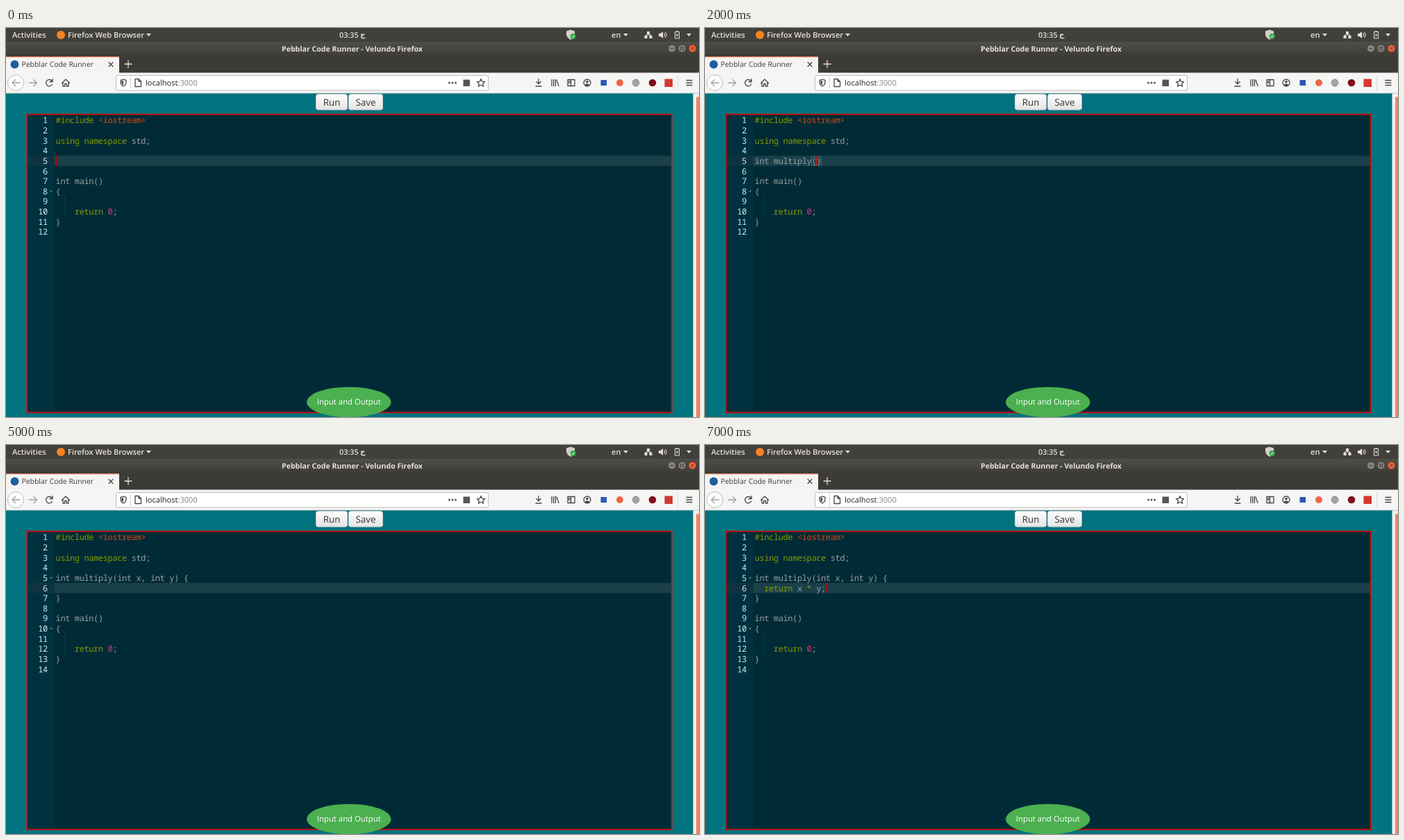
An HTML page for the animation above (8 s loop, 998x561 px).

```html
<!DOCTYPE html>
<html lang="en">
<head>
<meta charset="utf-8">
<title>Code editor</title>
<style>
  html, body { margin: 0; width: 998px; height: 561px; overflow: hidden; background: #00737f; }
  svg { display: block; font-family: "Open Sans", "Noto Sans", sans-serif; text-rendering: geometricPrecision; }
  .mono { font: 12px "Noto Sans Mono", "DejaVu Sans Mono", monospace; letter-spacing: -.384px; white-space: pre; }
  .panel { font-size: 11.1px; font-weight: 600; fill: #e4e1da; }
  .line { fill: none; stroke: #45454a; stroke-width: 1.3; stroke-linecap: round; stroke-linejoin: round; }
  .pale { fill: none; stroke: #dfdbd2; stroke-width: 1.1; }
</style>
</head>
<body>
<svg width="998" height="561" viewBox="0 0 998 561">
  <defs>
    <linearGradient id="bar" x2="0" y2="1">
      <stop offset="0" stop-color="#504e48"/><stop offset="1" stop-color="#3c3b37"/>
    </linearGradient>
    <linearGradient id="btn" x2="0" y2="1">
      <stop offset="0" stop-color="#fff"/><stop offset="1" stop-color="#e3e3e3"/>
    </linearGradient>
  </defs>

  <!-- desktop panel -->
  <rect width="998" height="20" fill="#42403b"/>
  <g class="panel">
    <text x="9" y="14">Activities</text>
    <circle cx="79" cy="10" r="6" fill="#f58220"/>
    <text x="89" y="14">Firefox Web Browser</text>
    <path d="M202 8h7l-3.500 4z"/>
    <text x="480" y="13.500" font-size="10.8">03:35</text>
    <text x="510" y="13" font-size="10.5" style="font-family:'DejaVu Sans',sans-serif">ج</text>
    <text x="872" y="14">en</text>
    <path d="M889 8h7l-3.500 4zM980 8h7l-3.500 4z"/>
    <path d="M813 2.500l6 2v5q-1 5-6 7.500q-5-2.500-6-7.500v-5z" fill="#d2d0cb"/>
    <circle cx="816.500" cy="12" r="4" fill="#35ad4c"/>
    <path d="M814.700 12l1.300 1.400l2.500-2.800" fill="none" stroke="#fff"/>
    <path d="M923 5h4v4h-4zM919.500 11h4v4h-4zM926.500 11h4v4h-4zM940 8h2.500l3.500-3v10l-3.500-3H940z"/>
    <path class="pale" d="M925 8v2.500M921.500 11.500v-1.500h7v1.500M947.500 7.500q2 2.500 0 5M949.500 6q3.200 4 0 8"/>
    <path class="pale" d="M963.500 5.500h6v9.500h-6zM965.500 4.500h2"/>
    <path d="M967 7l-2.300 3.500h1.800l-.8 3l2.700-4h-1.900z"/>
  </g>

  <!-- title bar and tabs -->
  <rect y="20" width="998" height="21" fill="url(#bar)"/>
  <rect y="40" width="998" height="25" fill="#3c3b37"/>
  <text x="498.500" y="33.700" text-anchor="middle" font-size="10.6" font-weight="700" fill="#e6e2da">Pebblar Code Runner - Velundo Firefox</text>
  <g stroke="#35342f" stroke-width=".8">
    <circle cx="959" cy="29.500" r="5.600" fill="#86847a"/>
    <circle cx="973.500" cy="29.500" r="5.600" fill="#86847a"/>
    <circle cx="988.500" cy="29.500" r="5.600" fill="#ef6035"/>
  </g>
  <path d="M956.800 29.500h4.400M971.500 27.700h4v3.600h-4zM986.700 27.700l3.600 3.600m0-3.600l-3.600 3.600" fill="none" stroke="#3a3934"/>
  <rect y="41" width="163" height="24" fill="#f5f4f2"/>
  <rect y="41" width="163" height="1.300" fill="#e9805c"/>
  <circle cx="12.500" cy="52.500" r="6" fill="#1d5f9e"/>
  <text x="22.500" y="56.200" font-size="10.4" fill="#3a3a3d">Pebblar Code Runner</text>
  <path class="line" d="M148 49.500l6 6m0-6l-6 6"/>
  <path class="line" style="stroke:#e2dfd7" d="M171 52h10m-5-5v10"/>

  <!-- toolbar -->
  <rect y="64.500" width="998" height="30" fill="#f5f5f4"/>
  <rect y="93.500" width="998" height="1" fill="#d0cfcc"/>
  <circle cx="14" cy="79" r="11.500" fill="#fbfbfb" stroke="#bdbcb9"/>
  <path class="line" style="stroke:#a2a2a2" d="M20 79H9m4.500-4.500L9 79l4.500 4.500M33.500 79h11m-4.500-4.500l4.500 4.500l-4.500 4.500"/>
  <path class="line" d="M66.500 77a4.700 4.700 0 1 0 0 4.200M67 73.500v4h-4M80.500 79.500l5.500-5.500l5.500 5.500M82 78.500v5.500h2.700v-3.500h2.600v3.500H90v-5.500"/>
  <rect x="158.500" y="68.500" width="536" height="21.500" rx="2" fill="#fff" stroke="#bcbbb8"/>
  <path class="line" d="M169 74l4 1.300v3.700q-.7 3.700-4 5q-3.300-1.300-4-5v-3.700zM186 73.500h5l3.500 3.500v7.500H186zM191 73.500V77h3.500"/>
  <path d="M169 75.500l-2.600 1v2.500q.4 2.400 2.600 3.500z" fill="#45454a"/>
  <path d="M179.500 71v17" stroke="#c9c9c9"/>
  <text x="201" y="83" font-size="11.1" fill="#252528">localhost<tspan fill="#85858a">:3000</tspan></text>
  <g fill="#55555a">
    <circle cx="638.500" cy="79" r="1.500"/><circle cx="643" cy="79" r="1.500"/><circle cx="647.500" cy="79" r="1.500"/>
    <rect x="658.500" y="74.500" width="9.500" height="9.500"/>
  </g>
  <path class="line" d="M684 73.500l1.700 3.700l4 .4l-3 2.700l.9 4l-3.600-2.100l-3.600 2.100l.9-4l-3-2.700l4-.4z"/>
  <path class="line" d="M767 73.500v7m-3.200-3l3.200 3.200l3.200-3.200M763 84h8M786 74.500v9M788.700 74.500v9M791.400 74.500v9M793 75l3 8.500"/>
  <path class="line" d="M809 74.500h10v9h-10zM813.500 74.500v9M810.500 77h1.500M810.500 79h1.500"/>
  <circle class="line" cx="837" cy="79" r="5"/>
  <circle cx="837" cy="77.500" r="1.800" fill="#45454a"/>
  <path d="M833.700 82q3.300-3.500 6.600 0q-3.300 3-6.600 0z" fill="#45454a"/>
  <rect x="856.500" y="75" width="8.500" height="8" fill="#2f57b8"/>
  <circle cx="884" cy="79" r="5" fill="#ee6546"/>
  <circle cx="907" cy="79" r="5" fill="#b8b8b8" stroke="#939393"/>
  <path d="M902 79h10M907 74v10M903.200 76.300h7.600M903.200 81.700h7.600" stroke="#8d8d8d" stroke-width=".7"/>
  <ellipse cx="907" cy="79" rx="2.500" ry="5" fill="none" stroke="#8d8d8d" stroke-width=".7"/>
  <circle cx="931" cy="79" r="5.300" fill="#800c1c"/>
  <rect x="948.500" y="73.500" width="11.500" height="11.500" fill="#d43832"/>
  <path d="M967.500 68v23" stroke="#deddda"/>
  <path class="line" d="M980 75.500h8M980 79h8M980 82.500h8"/>

  <!-- page -->
  <rect y="94.500" width="990" height="466.500" fill="#00737f"/>
  <rect x="989.500" y="94.500" width="8.500" height="466.500" fill="#f3f1ee"/>
  <rect x="994" y="99.500" width="4" height="461.500" fill="#ef8665"/>
  <rect x="446.500" y="95.500" width="45" height="22.500" rx="3" fill="url(#btn)" stroke="#c4c9c9"/>
  <rect x="493.500" y="95.500" width="49" height="22.500" rx="3" fill="url(#btn)" stroke="#c4c9c9"/>
  <g font-size="13.4" fill="#333" text-anchor="middle">
    <text x="469" y="111.500">Run</text><text x="518" y="111.500">Save</text>
  </g>
  <rect x="30.500" y="124.500" width="928" height="430" fill="#002b36"/>
  <rect x="31" y="125" width="38.500" height="429" fill="#01313f"/>
  <g id="editor"></g>
  <rect x="30.300" y="124.500" width="928.400" height="430" fill="none" stroke="#d90806" stroke-width="1.800"/>
  <ellipse cx="493.800" cy="539.500" rx="60.700" ry="21.800" fill="#4caf50"/>
  <text x="493.800" y="543.300" text-anchor="middle" font-size="11.36" fill="#fff">Input and Output</text>
</svg>
<script>
const LEFT = 71.6, TOP = 125.7, CHAR = 6.816, ROW = 14.64, STEP = 1000;
const editor = document.getElementById("editor");
const head = ["#include <iostream>", "", "using namespace std;", ""];
const tail = ["", "int main()", "{", "    ", "    return 0;", "}", ""];
const header = "int multiply(int x, int y) {";
const open = line => [...head, line, ...tail];
const closed = body => [...head, header, body, "}", ...tail];

// cur: caret column; boxes: bracket columns; popup: rows with matched letters in *stars*
const steps = [
  { code: open(""), row: 4, cur: 0 },
  { code: open("int mul"), row: 4, cur: 7, popup: ["*mu*tab*l*e"], at: 4 },
  { code: open("int multiply()"), row: 4, cur: 13, boxes: [12, 13] },
  { code: open("int multiply(int x, int)"), row: 4, cur: 23, boxes: [12, 23],
    popup: ["*int*", "re*int*erpret_cast"], at: 20 },
  { code: open(header), row: 4, cur: 28, boxes: [27] },
  { code: closed("  "), row: 5 },
  { code: closed("  return "), row: 5, cur: 9 },
  { code: closed("  return x * y;"), row: 5, cur: 15 }
];

const colX = c => LEFT + c * CHAR;
const rowY = r => TOP + r * ROW;
const esc = s => s.replace(/&/g, "&amp;").replace(/</g, "&lt;").replace(/>/g, "&gt;");
const rect = (x, y, w, h, style) => `<rect x="${x}" y="${y}" width="${w}" height="${h}" ${style}/>`;
const text = (x, y, fill, body, more = "") =>
  `<text class="mono" x="${x}" y="${y}" fill="${fill}" ${more}>${body}</text>`;

function paint(line) {
  return line.split(/(#include|<\w+>|\b(?:using|namespace|return)\b|\*|\b\d+\b)/).map((part, i) => {
    if (i % 2 === 0) return esc(part);
    const fill = part[0] === "<" ? "#cb4b16" : /^\d/.test(part) ? "#d33682" : "#859900";
    return `<tspan fill="${fill}">${esc(part)}</tspan>`;
  }).join("");
}

function drawPopup(rows, col) {
  const x = colX(col) - 3, y = 199.5, h = 19.3;
  let out = rect(x + 1.5, y + 1.5, 205.5, rows.length * h + 1, 'fill="#000" opacity=".25"') +
    rect(x, y, 205.5, rows.length * h + 1, 'fill="#fbfbfb" stroke="#d3d3d3"') +
    rect(x + .5, y + .5, 204.5, h, 'fill="#cad6fa"');
  rows.forEach((row, i) => {
    const body = row.split("*").map((s, k) =>
      k % 2 ? `<tspan font-weight="700" fill="#000">${s}</tspan>` : s).join("");
    out += text(x + 3, y + 14.3 + i * h, "#444", body);
  });
  return out;
}

function draw({ code, row, cur, boxes = [], popup, at }) {
  let out = rect(31, rowY(row), 38.5, ROW, 'fill="#0d3440"') +
    rect(69.5, rowY(row), 888.5, ROW, 'fill="#1a404a"');
  code.forEach((line, i) => {
    const y = rowY(i), base = y + 11.6;
    out += text(59.8, base, "#d0edf7", i + 1, 'text-anchor="end"');
    if (line.endsWith("{")) out += `<path d="M63 ${y + 6.3}h4l-2 2.6z" fill="#5e7c83"/>`;
    if (line.startsWith("    ")) out += rect(colX(2) - .8, y, .8, ROW, 'fill="#17414b"');
    out += text(LEFT, base, "#93a1a1", paint(line));
  });
  boxes.forEach(c => {
    out += rect(colX(c), rowY(row) + .5, CHAR, ROW - 1,
      'rx="2" fill="none" stroke="#93a1a1" stroke-opacity=".55" stroke-width=".8"');
  });
  if (cur !== undefined) out += rect(colX(cur), rowY(row), 1.5, ROW, 'fill="#d30102"');
  if (popup) out += drawPopup(popup, at);
  editor.innerHTML = out;
}

let shown = -1;
function tick(now) {
  const i = Math.floor(now / STEP) % steps.length;
  if (i !== shown) draw(steps[shown = i]);
  requestAnimationFrame(tick);
}
tick(0);
</script>
</body>
</html>
```
